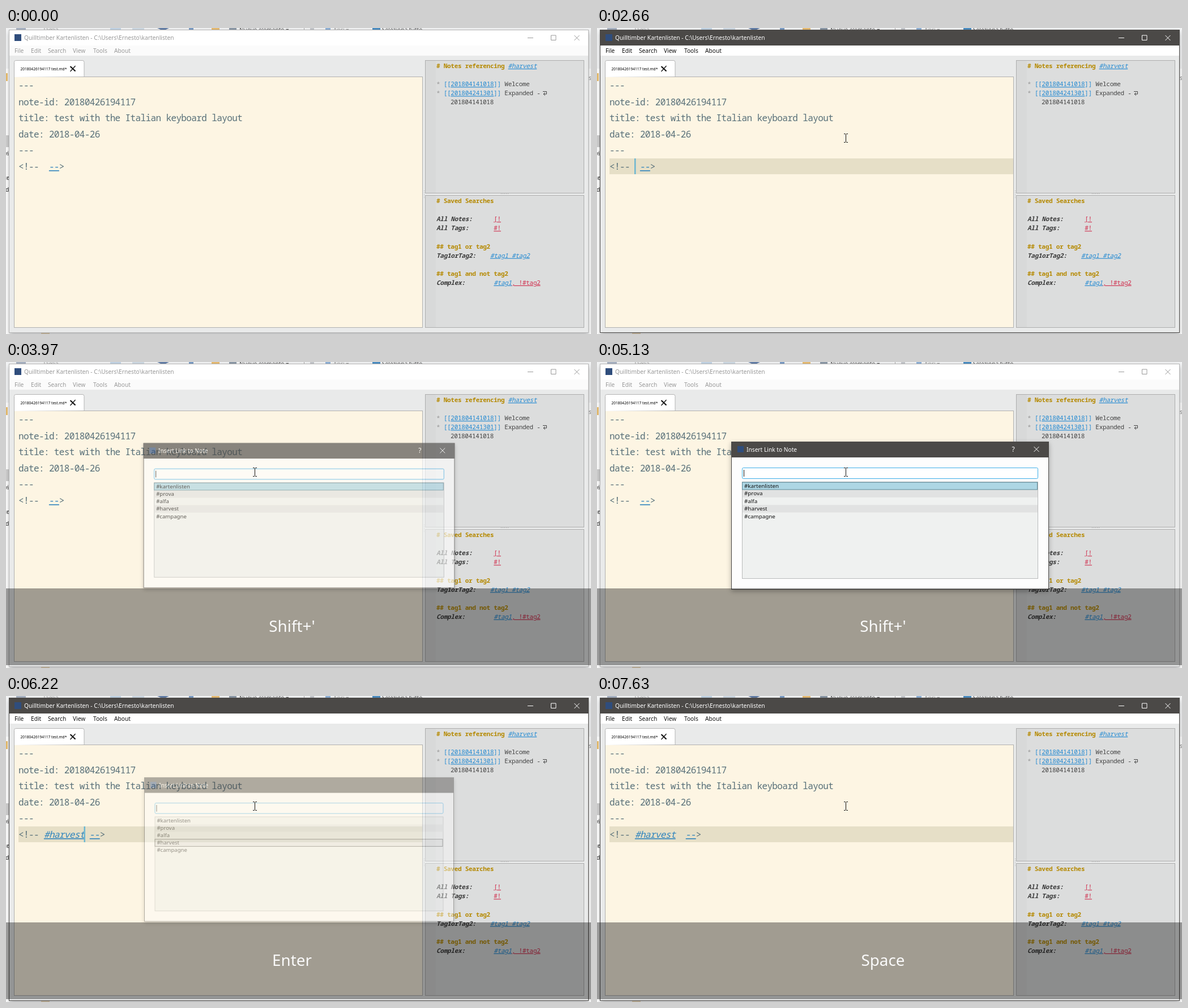
Write an HTML page that moves like this. It is 1033 px wide and 542 px high and loops after 8 s.

```html
<!DOCTYPE html>
<html lang="en">
<head>
<meta charset="utf-8">
<title>Note editor</title>
<style>
html, body { margin: 0; width: 100%; height: 100%; overflow: hidden; }
svg { display: block; width: 1033px; height: 542px; }
text { white-space: pre; font-family: "Noto Sans", "Open Sans", sans-serif; font-size: 10.2px; }
.doc text { font: 16px "Noto Sans Mono", monospace; letter-spacing: -.62px; fill: #587079; }
.side text { font: 11px "Noto Sans Mono", monospace; letter-spacing: -.27px; fill: #444; }
.doc .dim { fill: #8b9998; }
.doc .link { fill: #2f84bd; text-decoration: underline 1px; }
.side .head { fill: #b58900; font-weight: bold; }
.side .label { fill: #3a3a3a; font-weight: bold; font-style: italic; }
.side .star { fill: #999; }
.brace { fill: #268bd2; }
.url { fill: #268bd2; text-decoration: underline 1px; }
.side .label .url, .side .head .url { font-weight: normal; }
.bad { fill: #d0304f; font-weight: normal; font-style: normal; text-decoration: underline 1px; }
.i { font-style: italic; }
.panel { fill: #dcdddd; stroke: #adadad; }
.line { fill: none; stroke-width: 1; }
#win { --bar: #fff; --menu: #fbfbfb; --ink: #999; --menuInk: #999; --edge: #b5b5b5; }
#win.active { --bar: #4b4947; --menu: #fff; --ink: #fff; --menuInk: #111; --edge: #4b4947; }
.bar { fill: var(--bar); }
.menuBar { fill: var(--menu); }
.ink { fill: var(--ink); }
.inkLine { stroke: var(--ink); }
.menu text { fill: var(--menuInk); }
.edge { stroke: var(--edge); }
</style>
</head>
<body>
<svg viewBox="0 0 1033 542">
  <defs>
    <filter id="shadow" x="-10%" y="-10%" width="120%" height="125%">
      <feDropShadow dx="0" dy="3" stdDeviation="4" flood-opacity=".3"/>
    </filter>
  </defs>

  <!-- desktop behind the window -->
  <rect width="1033" height="542" fill="#f3f4f5"/>
  <g fill="#555">
    <rect x="18" width="17" height="4" fill="#a9b4c4"/>
    <rect x="184" width="19" height="4" fill="#c3d5e6"/>
    <rect x="223" width="21" height="4" fill="#cfdae4"/>
    <path d="M267 0l8 4h5l8-4z" fill="#6580a8"/>
    <rect x="323" width="8" height="4" fill="#7c9dc6"/>
    <rect x="363" width="14" height="4" fill="#e9bd73"/>
    <rect x="394" width="13" height="4" fill="#8d9aa8"/>
    <rect x="526" width="1" height="4" fill="#aaa"/>
    <rect x="537" width="7" height="4" fill="#c5c8cc"/>
    <rect x="564" width="9" height="4" fill="#8fb2d8"/>
    <rect x="647" width="14" height="4" fill="#4d8fc4"/>
    <text x="65" y="7" fill="#999">Taglia</text>
    <text x="412" y="7">Nuovo elemento ▾</text>
    <text x="578" y="7" fill="#999">Apri ▾</text>
    <text x="664" y="7">Seleziona tutto</text>
    <rect y="72" width="6" height="470" fill="#fff"/>
    <rect y="80" width="3" height="14" fill="#eabf70"/>
    <rect y="190" width="6" height="21" fill="#cfcfcf"/>
    <text x="-3" y="226" fill="#222">vi</text>
    <text x="-3" y="269" fill="#222">te</text>
    <text x="-1" y="290" fill="#222">d</text>
    <rect x="1029" y="72" width="4" height="470" fill="#fff"/>
    <text x="1029" y="92" fill="#888">s</text>
    <rect x="62" y="540" width="15" height="2" fill="#e3d2b8"/>
  </g>

  <g id="win">
    <rect x="6" y="4" width="1023" height="536" fill="#e9eaea" filter="url(#shadow)"/>
    <rect class="bar" x="6" y="4" width="1023" height="27"/>
    <rect class="menuBar" x="6" y="31" width="1023" height="18"/>
    <rect class="line edge" x="5.5" y="3.5" width="1023" height="536"/>
    <rect x="15" y="11" width="12" height="12" fill="#2f4d7c"/>
    <text class="ink" x="32" y="21">Quilltimber Kartenlisten - C:\Users\Ernesto\kartenlisten</text>
    <path class="line inkLine" d="M921 17.500h10M962.500 13h8.500v8.500h-8.500zM1003.500 13l9 9m0-9l-9 9"/>
    <g class="menu">
      <text x="15" y="44">File</text><text x="44" y="44">Edit</text>
      <text x="74" y="44">Search</text><text x="118" y="44">View</text>
      <text x="154" y="44">Tools</text><text x="191" y="44">About</text>
    </g>

    <rect x="14.500" y="86.500" width="721" height="444" fill="#fdf5e3" stroke="#b0b0b0"/>
    <path d="M14.500 87V60.500q0-3 3-3H135q3 0 3 3V86" fill="#fff" stroke="#b4b4b4"/>
    <text x="25.500" y="74.500" fill="#000" style="font-size:6.600px">20180426194117 test.md*</text>
    <path class="line" d="M113.500 68l9 8.500" stroke="#111" style="stroke-width:2.200"/>
    <path class="line" d="M122.500 67l-9 10" stroke="#111" style="stroke-width:1.300"/>

    <rect id="row" x="22" y="231" width="713" height="28" fill="#e6dfc7"/>
    <g class="doc">
      <text x="22" y="106.500">---</text>
      <text x="22" y="136.500">note-id: 20180426194117</text>
      <text x="22" y="165.300">title: test with the Italian keyboard layout</text>
      <text x="22" y="194">date: 2018-04-26</text>
      <text x="22" y="221.500">---</text>
      <text x="22" y="251">&lt;!-- <tspan id="tag" class="link i"></tspan><tspan id="gap"> </tspan><tspan class="link">--</tspan>&gt;</text>
    </g>
    <rect id="caret" y="231" width="2.500" height="28" fill="#6db7d1"/>

    <rect class="panel" x="740.500" y="57.500" width="280" height="235"/>
    <rect class="panel" x="740.500" y="296.500" width="280" height="234"/>
    <path d="M741 58h18v234h-18zM741 297h18v233h-18z" fill="#d8d9d9"/>
    <path class="line" d="M874 293.500h14M738.500 288v14" stroke="#aaa" stroke-dasharray="1 2"/>
    <g class="side">
      <text x="760" y="71" class="head"># Notes referencing <tspan class="url i">#harvest</tspan></text>
      <text x="760" y="103.200"><tspan class="star">* </tspan><tspan class="brace">[[</tspan><tspan class="url">201804141018</tspan><tspan class="brace">]]</tspan> Welcome</text>
      <text x="760" y="119.300"><tspan class="star">* </tspan><tspan class="brace">[[</tspan><tspan class="url">201804241301</tspan><tspan class="brace">]]</tspan> Expanded - </text>
      <path class="line" d="M948 112.500h6.500v4.500h-5m2.500-2.500l-3 2.500 3 2.500" stroke="#444"/>
      <text x="785" y="135.400">201804141018</text>

      <text x="760" y="310" class="head"># Saved Searches</text>
      <text x="760" y="342.200" class="label">All Notes:      <tspan class="bad">[!</tspan></text>
      <text x="760" y="358.300" class="label">All Tags:       <tspan class="bad">#!</tspan></text>
      <text x="760" y="390.500" class="head">## tag1 or tag2</text>
      <text x="760" y="406.600" class="label">Tag1orTag2:    <tspan class="url">#tag1 #tag2</tspan></text>
      <text x="760" y="438.800" class="head">## tag1 and not tag2</text>
      <text x="760" y="454.900" class="label">Complex:        <tspan class="url">#tag1</tspan><tspan class="bad">, !#tag2</tspan></text>
    </g>
  </g>

  <g id="dialog">
    <rect x="237.500" y="141.500" width="560" height="261" fill="#fdfdfd" stroke="#4b4947" filter="url(#shadow)"/>
    <rect x="237" y="141" width="561" height="28" fill="#4b4947"/>
    <rect x="248" y="149" width="11" height="11" fill="#2f4d7c"/>
    <text x="264" y="159" fill="#fff">Insert Link to Note</text>
    <g id="buttons">
      <text x="732.500" y="159" fill="#fff" style="font-size:12px">?</text>
      <path class="line" d="M771.500 150l9 9m0-9l-9 9" stroke="#fff"/>
    </g>
    <rect x="256.500" y="187.500" width="522" height="19" rx="2" fill="#fff" stroke="#3daee9"/>
    <rect id="field" x="259" y="191" width="1" height="12" fill="#111"/>
    <rect x="256.500" y="212.500" width="522" height="171" fill="#eff1f0" stroke="#b9bbbb"/>
    <path d="M257 226.400h521v13.400H257zM257 253.200h521v13.400H257z" fill="#e1e2e2"/>
    <rect id="pick" x="256.500" width="521" height="13"/>
    <g id="items" fill="#111"></g>
  </g>

  <g id="keys">
    <rect y="401" width="1033" height="136" opacity=".365"/>
    <text id="key" x="505" y="478" text-anchor="middle" fill="#fafafa" style="font-size:27.800px"></text>
  </g>

  <path id="mouse" class="line" d="M-3.500 -7.500h2.500l1 1 1-1h2.500M0 -6.500v13M-3.500 7.500h2.500l1-1 1 1h2.500" stroke="#111"/>
</svg>
<script>
const LOOP = 8000;
const $ = id => document.getElementById(id);
const show = (id, on) => { $(id).style.visibility = on ? 'visible' : 'hidden'; };

$('items').innerHTML = ['#kartenlisten', '#prova', '#alfa', '#harvest', '#campagne']
  .map((s, i) => `<text x="260" y="${223 + 13.4 * i}" style="font-size:9.8px">${s}</text>`).join('');

// Latest value whose time has passed; the list alternates time, value.
function at(t, ...list) {
  let value = list[1];
  for (let i = 0; i < list.length && list[i] <= t; i += 2) value = list[i + 1];
  return value;
}

// Pointer moves: start, end, steps, from, to
const moves = [
  [70, 840, 11, [845, 500], [86.5, 257.5]],
  [1000, 1000, 1, [86.5, 257.5], [86.5, 255.5]],
  [1160, 1320, 3, [86.5, 255.5], [69.5, 253.5]],
  [1800, 2020, 4, [69.5, 253.5], [439.5, 195]],
];

function pointer(t) {
  const [start, end, steps, from, to] = moves.filter(m => m[0] <= t).pop() || moves[0];
  const p = end > start ? Math.min(1, Math.max(0, (t - start) / (end - start))) : 1;
  const k = (Math.floor(p * (steps - 1) + 1e-6) + 1) / steps;
  const e = k * k * (3 - 2 * k);
  return from.map((v, i) => v + (to[i] - v) * e);
}

function draw(t) {
  $('win').classList.toggle('active', at(t, 0, false, 1460, true, 3890, false, 6220, true));
  show('row', at(t, 0, false, 1560, true, 3890, false, 6220, true));
  show('caret', at(t, 0, false, 1560, true, 2090, false, 2660, true, 3190, false,
    3660, true, 3890, false, 6220, true, 6790, false, 7160, true, 7630, false));
  $('caret').setAttribute('x', at(t, 0, 66, 6220, 137.5, 7160, 146.5));
  $('tag').textContent = t < 6220 ? '' : '#harvest';
  $('gap').textContent = t < 7160 ? ' ' : '  ';

  const alpha = at(t, 0, 0, 3890, .25, 3970, .65, 4060, .88, 4120, .97, 4190, 1, 6220, .43, 6320, .1, 6380, 0);
  const scale = at(t, 0, 1, 3890, .965, 3970, .98, 4060, .992, 4120, .998, 4190, 1, 6220, .975, 6320, .955);
  $('dialog').style.display = alpha > 0 ? '' : 'none';
  $('dialog').setAttribute('opacity', alpha);
  $('dialog').setAttribute('transform', `translate(517.5 272) scale(${scale}) translate(-517.5 -272)`);
  show('buttons', t < 6220);
  $('field').setAttribute('opacity', at(t, 0, 1, 4610, 0, 5130, 1));
  const pick = $('pick');
  pick.setAttribute('y', 213 + 13.4 * at(t, 0, 0, 5300, 1, 5610, 2, 5680, 3));
  pick.setAttribute('fill', t < 6220 ? '#add6e4' : '#e1e2e2');
  pick.setAttribute('stroke', t < 6220 ? '#5a8795' : '#555');

  show('keys', t >= 3190);
  $('key').textContent = at(t, 0, '', 3190, 'MAIUSC', 3350, 'Backspace', 3660, 'MAIUSC',
    3890, "Shift+'", 5220, 'Down', 6220, 'Enter', 7160, 'Space');

  show('mouse', t >= 70);
  $('mouse').setAttribute('transform', `translate(${pointer(t)})`);
}

const begin = performance.now();
function tick() {
  draw((performance.now() - begin) % LOOP);
  requestAnimationFrame(tick);
}
tick();
</script>
</body>
</html>
```
